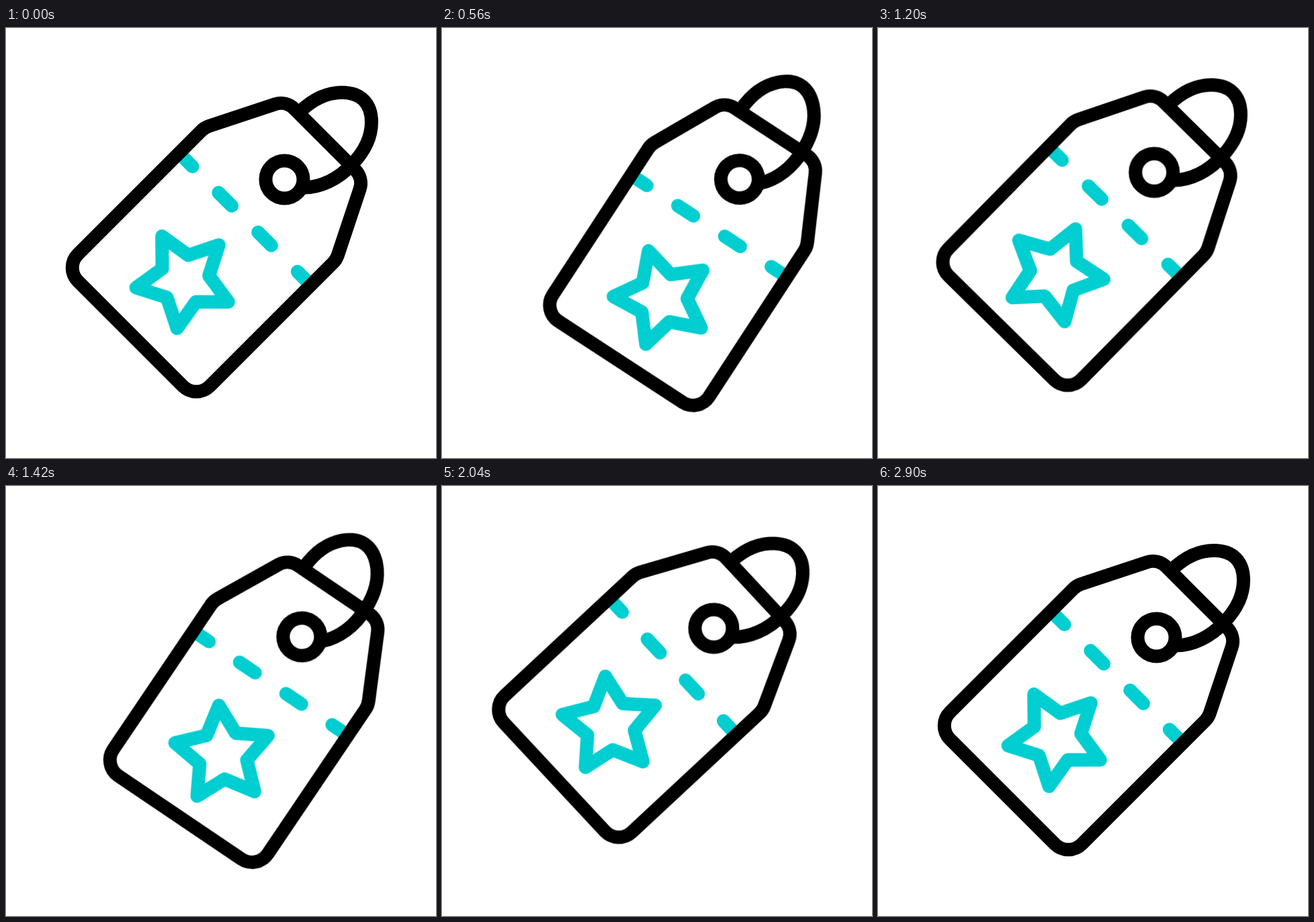
Animation, 640 px wide and 640 px high, one loop 3600 ms. Source, as an HTML page without scripts:

```html
<!DOCTYPE html>
<html lang="en">
<head>
<meta charset="utf-8">
<title>Price tag</title>
<style>
  html, body { margin: 0; width: 100%; height: 100%; overflow: hidden; background: #fff; }
  svg { display: block; width: 100%; height: 100%; }

  .ink, .accent { fill: none; stroke-width: 20; stroke-linejoin: round; }
  .ink { stroke: #000; }
  .accent { stroke: #00ced1; stroke-linecap: round; }

  .drift { animation: drift 3600ms cubic-bezier(.5, 0, .5, 1) infinite; }
  .tag {
    transform-origin: 482.6px 71.4px;
    animation: swing 3600ms cubic-bezier(.5, 0, .5, 1) infinite;
  }
  .star {
    transform-origin: 0 0;
    animation: spin 3600ms cubic-bezier(.5, 0, .5, 1) -10ms infinite;
  }

  /* sideways shift, returning later than the lift */
  @keyframes drift {
    0%        { transform: translateX(0); }
    14.44%    { transform: translateX(-4.6px); }
    60.28%    { transform: translateX(-4.6px); animation-timing-function: cubic-bezier(.8, 0, .5, 1); }
    80%, 100% { transform: translateX(0); }
  }
  /* lift, two swings, then settle and rest */
  @keyframes swing {
    0%        { transform: translateY(0) rotate(0deg); }
    14.44%    { transform: translateY(-11.1px) rotate(-12deg); }
    28.47%    { transform: translateY(-11.1px) rotate(3deg); }
    42.36%    { transform: translateY(-11.1px) rotate(-12deg); }
    60.28%    { transform: translateY(-11.1px) rotate(3deg); }
    80%, 100% { transform: translateY(0) rotate(0deg); }
  }
  @keyframes spin {
    0%        { transform: rotate(-27.3deg); }
    80%, 100% { transform: rotate(332.7deg); }
  }
</style>
</head>
<body>
<svg viewBox="0 0 640 640">
  <g class="drift"><g class="tag">
    <path class="accent" d="M262 190.7L277.5 206.2M316.3 245.1L336 264.8M375.2 304L394.9 323.7M433.8 362.6L449.3 378.1"/>
    <g transform="translate(265.6 374.8)">
      <path class="accent star" d="M0-73L21.7-29.9L69.4-22.6L35.2 11.4L42.9 59.1L0 37L-42.9 59.1L-35.2 11.4L-69.4-22.6L-21.7-29.9Z"/>
    </g>
    <path class="ink" d="M107 336.7L290.5 153.2Q295.4 148.3 302 146.1L400.1 113.4A28.3 28.3 0 0 1 429 120.3L519.7 211A28.3 28.3 0 0 1 526.6 239.9L493.9 338Q491.7 344.6 486.8 349.5L303.3 533A28.3 28.3 0 0 1 263.3 533L107 376.7A28.3 28.3 0 0 1 107 336.7Z"/>
    <circle class="ink" cx="414.5" cy="225.5" r="28"/>
    <path class="ink" d="M436 126L438 124C457 106 479 96 500 96C513 96 525 100 532.5 107.5C540 115 544 127 544 140C544 161 534 183 516 202C495 225 468 237.5 443 237.5"/>
  </g></g>
</svg>
</body>
</html>
```
